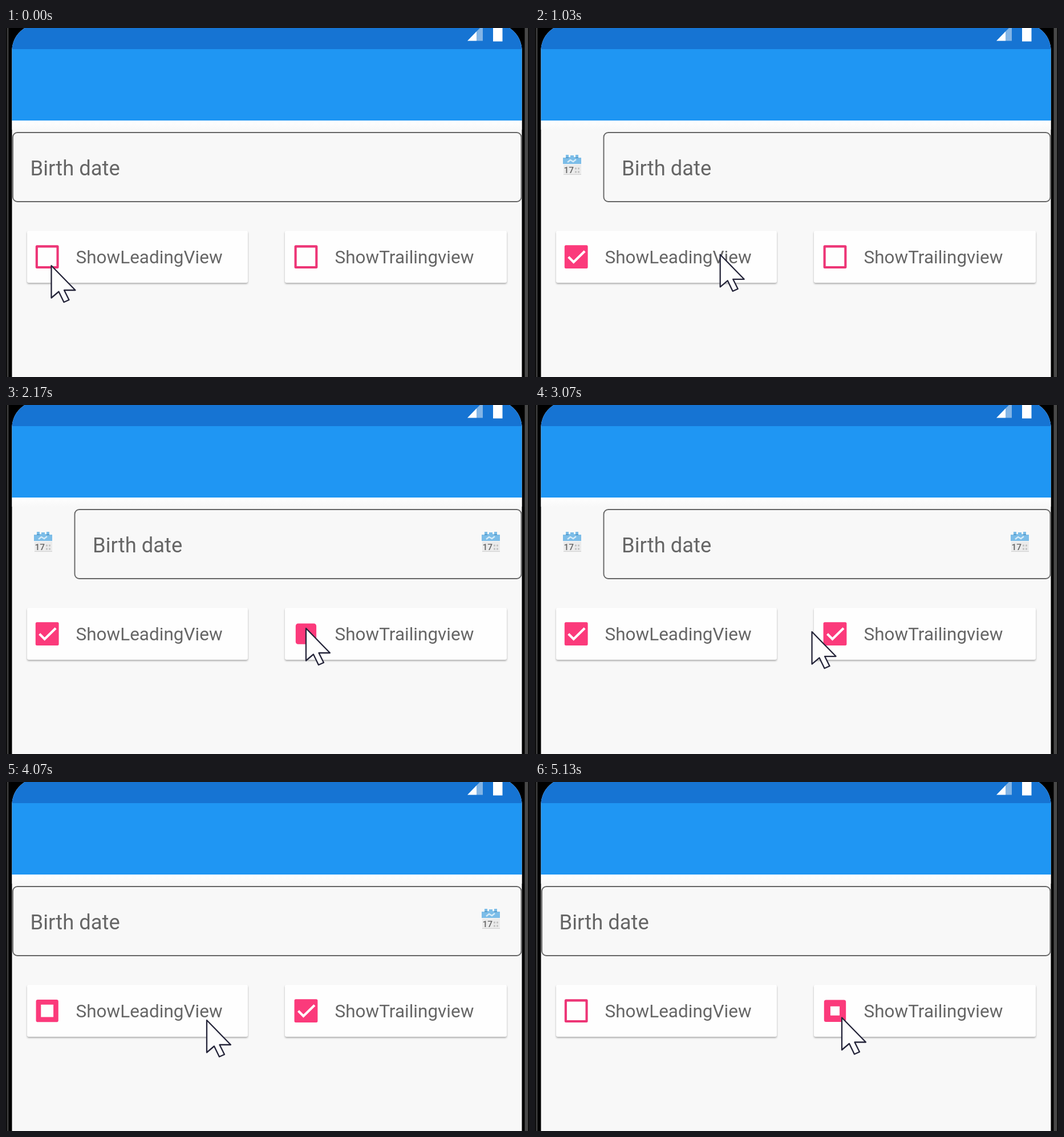
An HTML page that plays this animation: 917 px wide and 611 px high, repeating every 5160 ms.

```html
<!DOCTYPE html>
<html lang="en">
<head>
<meta charset="utf-8">
<title>Leading and trailing views</title>
<style>
html, body { margin: 0; width: 100%; height: 100%; overflow: hidden; background: #000; }
svg { display: block; width: 100vw; height: 100vh; }
text { font-family: Roboto, Arial, sans-serif; fill: #666; }
.card { fill: #fefefe; filter: drop-shadow(0 2px 1.5px rgba(0, 0, 0, .3)); }
.soft { filter: blur(.6px); }
</style>
</head>
<body>
<svg viewBox="0 0 917 611" xmlns="http://www.w3.org/2000/svg">
  <defs>
    <clipPath id="screen"><path d="M10.500 620V36Q13 11 36-2V-9H880V-2Q902 11 904.500 36V620Z"/></clipPath>
    <linearGradient id="fade" x2="0" y2="1">
      <stop offset="0" stop-color="#fff"/><stop offset="1" stop-color="#f8f8f8"/>
    </linearGradient>
    <g id="calendar">
      <path d="M50 256.500V239H81V256.500Z" fill="#ebebeb"/>
      <path d="M49 238V227H54V222H59V226H62V223H68V226H71V222H76V227H81V238Z" fill="#7cbde8"/>
      <path d="M54 227H59M71 227H76" stroke="#5d9fcc" stroke-width="2"/>
      <path d="M57 235L62 231L67 234L72 230" fill="none" stroke="#d5ebf8" stroke-width="2.500"/>
      <text x="50.500" y="254" font-size="15.500" font-weight="500">17</text>
      <path d="M70 246H80M70 252H80" stroke="#c2c2c2" stroke-width="3" stroke-dasharray="3 2"/>
      <path d="M50 256.500H81" stroke="#cfcfcf"/>
    </g>
  </defs>

  <g class="soft">
    <path d="M3 -9V620" stroke="#3c3c3c" stroke-width="3"/>
    <path d="M912.500 -9V620" stroke="#484848" stroke-width="6"/>

    <g clip-path="url(#screen)">
      <rect y="-9" width="917" height="630" fill="#f8f8f8"/>
      <rect y="-9" width="917" height="46" fill="#1674d3"/>
      <rect y="37" width="917" height="125" fill="#1f96f3"/>
      <rect y="162" width="917" height="16" fill="url(#fade)"/>
      <path d="M809 22.500L825 6V22.500Z" fill="#fff"/>
      <path d="M825 22.500V6L836-5V22.500Z" fill="#83b5e6"/>
      <rect x="854" y="-9" width="16.500" height="32.500" fill="#fff"/>
    </g>

    <rect id="field" y="183" height="121" rx="8" fill="#f8f8f8" stroke="#666" stroke-width="1.900"/>
    <text id="label" y="258" font-size="36.400">Birth date</text>
    <use id="leadingIcon" href="#calendar"/>
    <use id="trailingIcon" href="#calendar" x="785"/>

    <rect class="card" x="37" y="355" width="387" height="91" rx="3"/>
    <rect class="card" x="489" y="355" width="389" height="91" rx="3"/>
    <text x="122.500" y="412" font-size="31.500">ShowLeadingView</text>
    <text x="576.500" y="412" font-size="31.500">ShowTrailingview</text>
    <g id="leadingBox" transform="translate(72.200 400.700)"></g>
    <g id="trailingBox" transform="translate(526 400.700)"></g>

    <path id="cursor" d="M0 0V56.500L13 45.500L22 64L31 60L22.500 43H42Z"
          fill="#fdfdfd" stroke="#25253a" stroke-width="2.300" stroke-linejoin="round"/>
  </g>
</svg>

<script>
const LOOP = 5160;
const BOX = 20.4, SMALL = 18, HOLE = 16.3;
const leading = { on: 300, off: 3787 };
const trailing = { on: 2010, off: 4882 };
// Each move: start, end, target x, target y.
const moves = [
  [690, 1330, 526, 381],
  [1750, 1950, 526, 391],
  [2780, 3710, 352, 417],
  [4210, 4800, 538, 412.5]
];

const $ = id => document.getElementById(id);
const ramp = (t, a, b) => Math.min(1, Math.max(0, (t - a) / (b - a)));
const ease = u => u * u * (3 - 2 * u);
const mix = (a, b, u) => a + (b - a) * u;

// Checking closes the hole, then grows the tick; unchecking reverses that.
function boxState(t, { on, off }) {
  const closing = t < off;
  const first = closing ? on : off;
  const shrink = ramp(t, first, first + 150);
  const grow = ramp(t, first + 150, first + 350);
  return {
    half: mix(BOX, SMALL, shrink - grow),
    round: 2.5 + 2 * (shrink - grow),
    hole: HOLE * (closing ? 1 - shrink : grow),
    tick: closing ? ease(ramp(t, on + 150, on + 410)) : 1 - shrink
  };
}

function drawBox(id, t, times) {
  const { half, round, hole, tick } = boxState(t, times);
  const square = (h, r, fill) =>
    `<rect x="${-h}" y="${-h}" width="${2 * h}" height="${2 * h}" rx="${r}" fill="${fill}"/>`;
  const color = hole > HOLE - .1 ? '#ed3576' : '#fb3a7b';
  $(id).innerHTML = square(half, round, color) + square(hole, .5, '#fefefe') +
    `<path transform="scale(${tick})" d="M-13.500 0L-4.500 9L15-10"
      fill="none" stroke="#fff" stroke-width="4.200"/>`;
}

function cursorAt(t) {
  return moves.reduce(([x, y], [a, b, toX, toY]) => {
    const u = ease(ramp(t, a, b));
    return [mix(x, toX, u), mix(y, toY, u)];
  }, [79.5, 416]);
}

function shown(t, { on, off }) {
  return t >= on + 40 && t < off + 40;
}

function draw(t) {
  const lead = shown(t, leading);
  const left = lead ? 120.5 : 12;
  $('field').setAttribute('x', left);
  $('field').setAttribute('width', 903.5 - left);
  $('label').setAttribute('x', lead ? 152 : 42.5);
  $('leadingIcon').setAttribute('visibility', lead ? 'visible' : 'hidden');
  $('trailingIcon').setAttribute('visibility', shown(t, trailing) ? 'visible' : 'hidden');
  drawBox('leadingBox', t, leading);
  drawBox('trailingBox', t, trailing);
  $('cursor').setAttribute('transform', `translate(${cursorAt(t)})`);
}

const start = performance.now();
function tick() {
  draw((performance.now() - start) % LOOP);
  requestAnimationFrame(tick);
}
tick();
</script>
</body>
</html>
```
